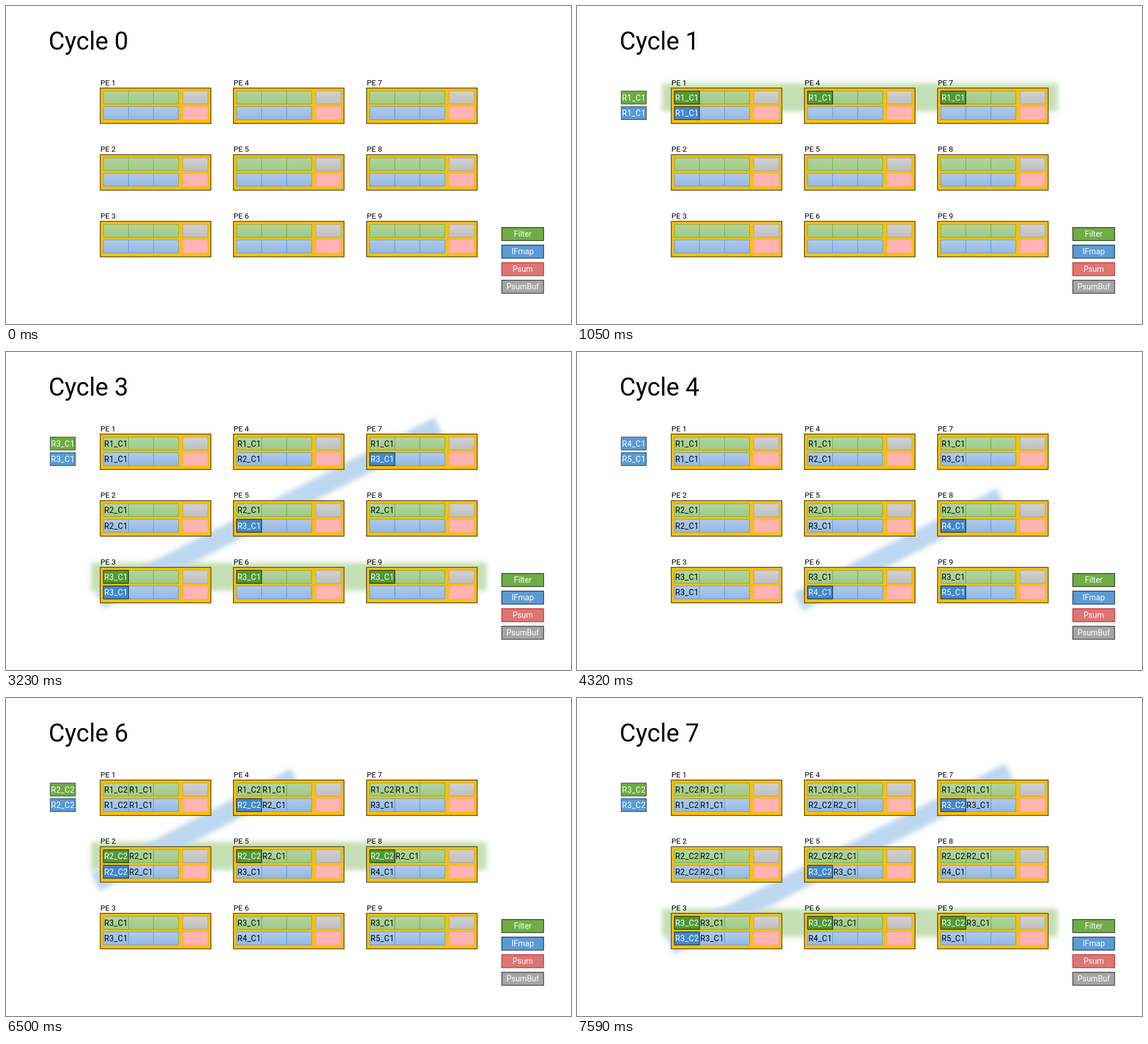
Write an HTML page with a canvas that moves like this. It is 998 px wide and 561 px high and loops after 8000 ms.

```html
<!DOCTYPE html>
<html lang="en">
<head>
<meta charset="utf-8">
<title>PE array cycles</title>
<style>
html, body { margin: 0; width: 100%; height: 100%; overflow: hidden; background: #fff; }
canvas { display: block; }
</style>
</head>
<body>
<canvas id="stage" width="998" height="561"></canvas>
<script>
const ctx = document.getElementById('stage').getContext('2d');
const FONT = 'Roboto, "Open Sans", sans-serif';
const LOOP = 8000, FIRST = 1050, STEP = 1090;

const CELL_W = 44.2, CELL_H = 22.8, ROW_GAP = 27.5;
const peX = col => 166.5 + 235.2 * col;
const peY = row => 144.7 + 117.6 * row;

const STYLE = {
  green: { soft: ['#b3d3a2', '#9fca86'], edge: '#70ad47', hot: '#529a35', hotEdge: '#20380f', input: '#6dab44', inputEdge: '#38592a' },
  blue: { soft: ['#b0cae9', '#94b9e4'], edge: '#5b9bd5', hot: '#4389cb', hotEdge: '#1b3a57', input: '#5a9ad5', inputEdge: '#2b506f' },
  grey: { soft: ['#d1d1d1', '#bfbfbf'], edge: '#a5a5a5' },
  pink: { soft: ['#ffb4b4', '#ffb4b4'], edge: '#ff9f9f' }
};

const LEGEND = [
  ['Filter', '#70ad47', '#24401a'],
  ['IFmap', '#5b9bd5', '#203f5a'],
  ['Psum', '#dc7674', '#cf2f2f'],
  ['PsumBuf', '#a5a5a5', '#424242']
];

// Diagonal highlight ends [x1, y1, x2, y2] by phase within a group of four cycles
const DIAGONALS = {
  2: [158, 325, 511, 140],
  3: [165, 437, 764, 131],
  4: [391, 441, 749, 256]
};

function box(x, y, w, h, fill, edge, line) {
  ctx.fillStyle = fill;
  ctx.fillRect(x, y, w, h);
  ctx.strokeStyle = edge;
  ctx.lineWidth = line;
  ctx.strokeRect(x, y, w, h);
}

function text(str, x, y, size, color, align = 'center', spacing = 0) {
  ctx.font = `${size}px ${FONT}`;
  ctx.letterSpacing = spacing + 'px';
  ctx.textAlign = align;
  ctx.fillStyle = color;
  ctx.fillText(str, x, y);
}

function cell(x, y, style, label, hot) {
  const g = ctx.createLinearGradient(0, y, 0, y + CELL_H);
  style.soft.forEach((c, i) => g.addColorStop(i, c));
  box(x, y, CELL_W, CELL_H, hot ? style.hot : g, hot ? style.hotEdge : style.edge, hot ? 1.4 : 1);
  if (label) cellText(label, x, y, hot ? '#fff' : '#000');
}

function cellText(label, x, y, color) {
  text(label, x + CELL_W / 2 + 0.2, y + 16.4, 14, color, 'center', 0.4);
}

// Newest value sits in the first slot and pushes older ones to the right
function register(x, y, style, index, arrival, cycle) {
  const count = Math.max(0, Math.floor((cycle - arrival) / 4) + 1);
  const hot = slot => slot === 0 && count > 0 && (cycle - arrival) % 4 === 0;
  for (const slot of [2, 1, 0]) {
    const label = slot < count ? `R${index}_C${count - slot}` : '';
    cell(x + slot * CELL_W, y, style, label, hot(slot));
  }
}

function element(col, row, cycle) {
  const x = peX(col), y = peY(row), diag = col + row + 1;
  text(`PE ${col * 3 + row + 1}`, x + 0.3, y - 5.2, 13.5, '#000', 'left');
  box(x, y, 195.4, 62.6, '#ffc000', '#574a2b', 1.5);
  register(x + 5.6, y + 5.4, STYLE.green, row + 1, row + 1, cycle);
  register(x + 5.6, y + 5.4 + ROW_GAP, STYLE.blue, diag, Math.min(diag, 4), cycle);
  cell(x + 145.8, y + 5.4, STYLE.grey);
  cell(x + 145.8, y + 5.4 + ROW_GAP, STYLE.pink);
}

function glow(x1, y1, x2, y2, width, color) {
  ctx.save();
  ctx.filter = 'blur(4px)';
  ctx.strokeStyle = color;
  ctx.lineWidth = width;
  ctx.beginPath();
  ctx.moveTo(x1, y1);
  ctx.lineTo(x2, y2);
  ctx.stroke();
  ctx.restore();
}

function highlights(phase) {
  if (phase >= 1 && phase <= 3) {
    const y = peY(phase - 1) + 16.5;
    glow(150, y, 849, y, 50, '#c5e0b4');
  }
  if (DIAGONALS[phase]) glow(...DIAGONALS[phase], 35, '#bdd7ee');
}

function inputs(phase, step) {
  const items = phase === 4 ? [['blue', 4], ['blue', 5]] : [['green', phase], ['blue', phase]];
  items.forEach(([name, index], i) => {
    const y = 150.1 + i * ROW_GAP, s = STYLE[name];
    box(78.2, y, CELL_W, CELL_H, s.input, s.inputEdge, 1.2);
    cellText(`R${index}_C${step}`, 78.2, y, '#fff');
  });
}

function draw(cycle) {
  const phase = cycle && (cycle - 1) % 4 + 1;
  ctx.fillStyle = '#fff';
  ctx.fillRect(0, 0, 998, 561);
  text(`Cycle ${cycle}`, 75.2, 77, 43.7, '#000', 'left');
  highlights(phase);
  if (cycle) inputs(phase, Math.ceil(cycle / 4));
  for (let col = 0; col < 3; col++)
    for (let row = 0; row < 3; row++) element(col, row, cycle);
  LEGEND.forEach(([label, fill, edge], i) => {
    const y = 390.8 + i * 31;
    box(875.8, y, 73.8, 23, fill, edge, 1.4);
    text(label, 912.7, y + 16.4, 14, '#fff');
  });
}

let shown = -1;
const start = performance.now();
function tick() {
  const t = (performance.now() - start) % LOOP;
  const cycle = t < FIRST ? 0 : Math.floor((t - FIRST) / STEP) + 1;
  if (cycle !== shown) draw(shown = cycle);
  requestAnimationFrame(tick);
}
tick();
</script>
</body>
</html>
```
